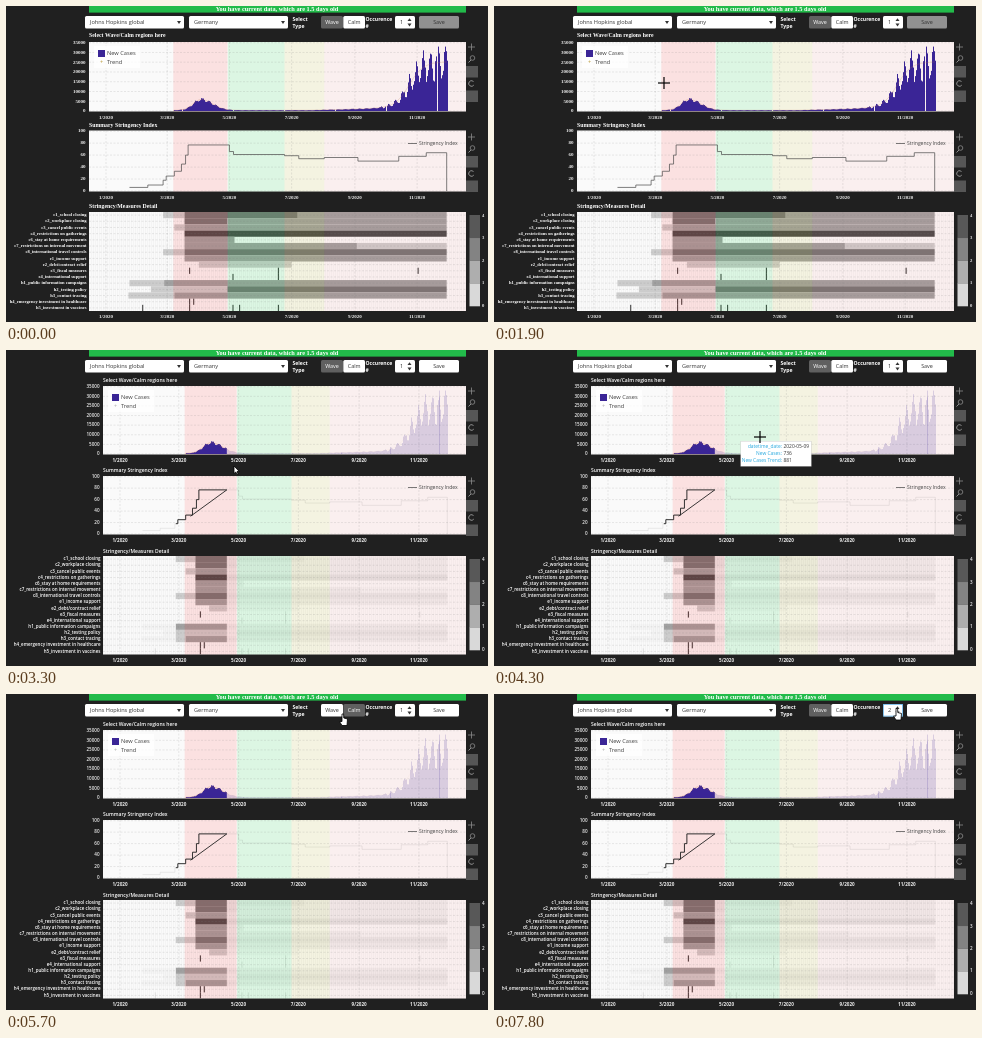
These frames come from a looping animation (482 by 316 pixels, 8000 ms). An HTML page with a canvas:

```html
<!DOCTYPE html>
<html lang="en">
<head>
<meta charset="utf-8">
<title>Wave selection dashboard</title>
<style>
html, body { margin: 0; width: 482px; height: 316px; overflow: hidden; background: #202020; }
canvas { display: block; width: 482px; height: 316px; }
</style>
</head>
<body>
<canvas id="stage"></canvas>
<script>
const LOOP = 8000, STEP = 100;
const canvas = document.getElementById('stage');
const ratio = window.devicePixelRatio || 1;
canvas.width = 482 * ratio;
canvas.height = 316 * ratio;
const c = canvas.getContext('2d');

const SERIF = '"Liberation Serif", serif', SANS = '"Open Sans", sans-serif';
const PURPLE = '#3a2596', GRID = 'rgba(120,120,120,.28)';
const RIGHT = 460, LAST = 334;

// Layout before and after the selection is applied
const BEFORE = {
  left: 83, x0: 100, scale: 1.02, font: SERIF, weight: 700, title: 5.8, tick: 5, row: 4.55,
  titleY: 30, top: [36, 105.5], mid: [124.5, 185.5], low: [206, 305]
};
const AFTER = {
  left: 97, x0: 114, scale: .98, font: SANS, weight: 600, title: 5, tick: 4.6, row: 4.5,
  titleY: 31, top: [36, 104.5], mid: [126, 184.5], low: [206, 304.5],
  pick: [57, 109]
};

const MONTHS = [1, 3, 5, 7, 9, 11].map(m => [(Date.UTC(2020, m - 1) - Date.UTC(2020, 0)) / 864e5, m]);
const BANDS = [
  [66, 119, 'rgba(255,20,20,.11)'], [119.5, 175, 'rgba(0,215,60,.12)'],
  [175, 214, 'rgba(185,180,0,.10)'], [214, 353, 'rgba(255,60,60,.055)']
];
// Day and new value of each change
const INDEX = [[23, 6], [41, 10], [56, 18], [59, 25], [67, 33], [74, 45], [78, 60], [80.5, 77],
  [121, 66], [125, 61], [175, 59], [189, 54], [214, 56], [247, 50], [287, 58], [314, 64], [LAST, 0]];
// Light from `lead`, full from `on`, one level lower from `ease`
const ROWS = [
  { name: 'c1_school closing', level: 3, lead: 56, ease: 188 },
  { name: 'c2_workplace closing', level: 3, ease: 119 },
  { name: 'c3_cancel public events', level: 2, lead: 67 },
  { name: 'c4_restrictions on gatherings', level: 4 },
  { name: 'c6_stay at home requirements', level: 2, end: 126 },
  { name: 'c7_restrictions on internal movement', level: 2, ease: 246 },
  { name: 'c8_international travel controls', level: 3, lead: 56 },
  { name: 'e1_income support', level: 2 },
  { name: 'e2_debt/contract relief', level: 1, on: 91, end: 182 },
  { name: 'e3_fiscal measures', marks: [82, 169, 306] },
  { name: 'e4_international support', marks: [124.5, 169] },
  { name: 'h1_public information campaigns', level: 2, lead: 23, on: 57 },
  { name: 'h2_testing policy', level: 3, lead: 44, on: 119 },
  { name: 'h3_contact tracing', level: 2, lead: 22, on: 67 },
  { name: 'h4_emergency investment in healthcare', marks: [82, 86] },
  { name: 'h5_investment in vaccines', marks: [36, 82, 124.5, 131, 169] }
];

const grey = level => `rgb(${Array(3).fill(247 - 43 * level)})`;
const noise = n => Math.abs(Math.sin(n * 127.1) * 43758.5) % 1;
const dayX = (g, d) => g.x0 + g.scale * d;

function trend(d) {
  const spring = 5500 * Math.exp(-(((d - 93) / (d < 93 ? 11 : 16)) ** 2));
  const autumn = 23000 / (1 + Math.exp((297 - d) / 7));
  return spring + autumn + (d > 66 ? 400 : 0) + Math.max(0, d - 200) * 14;
}

function cases(d) {
  const swing = d < 270 ? .13 : .33;
  return Math.min(33000, trend(d) * (1 + swing * (Math.cos((d - 311) * 2 * Math.PI / 7) + .7 * noise(d) - .35)));
}

function text(s, x, y, size, { font = SANS, color = '#eee', align = 'left', weight = 400 } = {}) {
  c.font = `${weight} ${size}px ${font}`;
  c.textAlign = align;
  c.textBaseline = 'middle';
  c.fillStyle = color;
  c.fillText(s, x, y);
}

function box(x1, y1, x2, y2, color) {
  c.fillStyle = color;
  c.fillRect(x1, y1, x2 - x1, y2 - y1);
}

function path(points, color, width = 1) {
  c.beginPath();
  points.forEach(p => c.lineTo(p[0], p[1]));
  c.strokeStyle = color;
  c.lineWidth = width;
  c.stroke();
}

function ring(x, y, r, from = 0, to = 7) {
  c.beginPath();
  c.arc(x, y, r, from, to);
  c.stroke();
}

function bands(g, [y1, y2]) {
  for (const [a, b, color] of BANDS) box(dayX(g, a), y1, Math.min(dayX(g, b), RIGHT), y2, color);
}

function grid(g, [y1, y2], ys) {
  c.save();
  c.setLineDash([2, 1.5]);
  for (const y of ys) path([[g.left, y], [RIGHT, y]], GRID, .6);
  for (const [d] of MONTHS) path([[dayX(g, d), y1], [dayX(g, d), y2]], GRID, .6);
  c.restore();
}

function frame(g, name, titleY, [y1, y2]) {
  text(name, g.left, titleY, g.title, { font: g.font, weight: g.weight, color: '#fff' });
  box(g.left, y1, RIGHT, y2, '#fafafa');
  for (const [d, m] of MONTHS)
    text(m + '/2020', dayX(g, d), y2 + 6, g.tick, { font: g.font, weight: 700, align: 'center' });
}

// Bands, grid and value labels; returns the value-to-y mapping
function valueAxis(g, [y1, y2], max, step) {
  const y = v => y2 - .5 - v / max * (y2 - y1 - 1.2);
  const ys = [];
  for (let v = 0; v <= max; v += step) {
    ys.push(y(v));
    text(v, g.left - 3.5, y(v), g.tick, { font: g.font, weight: g.weight, align: 'right' });
  }
  bands(g, [y1, y2]);
  grid(g, [y1, y2], ys);
  return y;
}

// Draws all data, or faint data with the picked days at full strength
function emphasise(g, [y1, y2], faint, draw) {
  if (!g.pick) return draw();
  const [a, b] = g.pick.map(d => dayX(g, d));
  c.save();
  c.globalAlpha = faint;
  draw();
  c.globalAlpha = 1;
  c.beginPath();
  c.rect(a, y1, b - a, y2 - y1);
  c.clip();
  draw();
  c.restore();
}

function casesPlot(g) {
  frame(g, 'Select Wave/Calm regions here', g.titleY, g.top);
  const y = valueAxis(g, g.top, 35000, 5000);
  emphasise(g, g.top, .17, () => {
    const line = [];
    for (let d = 66; d <= LAST; d++) {
      const x = Math.round(dayX(g, d));
      box(x, y(cases(d)), x + 1, y(0), PURPLE);
      line.push([x, y(trend(d))]);
    }
    path(line, 'rgba(190,120,80,.45)', .5);
  });
  const x = g.left + 9;
  box(x - 4, 40, x + 42, 62, 'rgba(255,255,255,.8)');
  box(x, 44, x + 7, 51, PURPLE);
  text('New Cases', x + 9, 47.3, 5.7, { color: '#444' });
  text('+', x + 3.5, 56.5, 5.5, { color: g.pick ? '#aaa' : '#b8962e', align: 'center' });
  text('Trend', x + 9, 56.8, 5.7, { color: '#444' });
}

function indexPlot(g) {
  frame(g, 'Summary Stringency Index', g.titleY + 90, g.mid);
  const y = valueAxis(g, g.mid, 100, 20);
  const line = INDEX.flatMap(([d, v], i) => [[d, INDEX[Math.max(0, i - 1)][1]], [d, v]]);
  const plot = (points, color, width) => path(points.map(([d, v]) => [dayX(g, d), y(v)]), color, width);
  if (g.pick) {
    const [a, b] = g.pick;
    plot(line, 'rgba(60,60,60,.13)', .7);
    plot([[a, 18], ...line.filter(p => p[0] > a && p[0] < b), [b, 77], [72, 31]], '#222', .9);
  } else plot(line, '#4a4a4a', .7);
  path([[402, 137.5], [411, 137.5]], '#444', .7);
  text('Stringency Index', 413, 137.5, 5, { color: '#444' });
}

function detailPlot(g) {
  frame(g, 'Stringency/Measures Detail', g.titleY + 170.3, g.low);
  const [y1, y2] = g.low, h = (y2 - y1) / ROWS.length;
  for (let x = g.left; x < RIGHT; x += 2) box(x, y1, x + 1, y2, 'rgba(0,0,0,.025)');
  emphasise(g, g.low, .12, () => ROWS.forEach((row, i) => {
    const { level, on = 77, lead = on, end = LAST, ease = end, marks = [] } = row;
    const bar = (a, b, color) => box(dayX(g, a), y1 + i * h, dayX(g, b), y1 + (i + 1) * h, color);
    if (level) {
      bar(lead, on, grey(1));
      bar(on, ease, grey(level));
      bar(ease, end, grey(level - 1));
    }
    for (const d of marks) bar(d - .5, d + .5, '#333');
  }));
  bands(g, g.low);
  const rowY = i => y1 + (i + .5) * h;
  grid(g, g.low, ROWS.map((row, i) => rowY(i)));
  ROWS.forEach((row, i) => text(row.name, g.left - 2.5, rowY(i), g.row,
    { font: g.font, weight: g.weight, align: 'right', color: '#fff' }));
  for (let n = 0; n < 5; n++) {
    if (n) box(463.5, 300 - n * 22.75, 474, 300.3 - (n - 1) * 22.75, grey(n - .3));
    text(n, 476, 299.5 - n * 22.4, 4.6, { font: g.font, weight: 600 });
  }
}

function tools(y) {
  const color = '#8c8c8c', x = 465.5;
  path([[x - 3.5, y], [x + 3.5, y]], color, .8);
  path([[x, y - 3.5], [x, y + 3.5]], color, .8);
  ring(x + 1, y + 11, 2.3);
  path([[x - .5, y + 13], [x - 3, y + 15.5]], color);
  ring(x, y + 36.5, 2.8, .6, 5.6);
  for (const top of [19, 43.5]) box(460, y + top, 472, y + top + 11.5, '#565656');
}

function field(x1, x2, color = '#fff') {
  c.fillStyle = color;
  c.beginPath();
  c.roundRect(x1, 10, x2 - x1, 12.5, 1.5);
  c.fill();
}

function triangle(x, y, k = 1.4) {
  c.fillStyle = '#333';
  c.beginPath();
  c.moveTo(x - 2, y - k);
  c.lineTo(x + 2, y - k);
  c.lineTo(x, y + k);
  c.fill();
}

function dropdown(s, x1, x2) {
  field(x1, x2);
  text(s, x1 + 5, 16.3, 5.6, { color: '#333' });
  triangle(x2 - 5, 16.5);
}

function button(s, x1, x2, bg, color = '#333') {
  field(x1, x2, bg);
  text(s, (x1 + x2) / 2, 16.3, 5.4, { color, align: 'center' });
}

function label(a, b, x) {
  [a, b].forEach((s, i) => text(s, x, 13.7 + i * 6.8, 5.1, { weight: 700, color: '#fff' }));
}

function controls(t, g) {
  box(83, 0, RIGHT, 6.6, '#22bb4a');
  text('You have current data, which are 1.5 days old', 271, 3.2, 6.3,
    { font: SERIF, weight: 700, align: 'center', color: '#fff' });
  dropdown('Johns Hopkins global', 79, 178);
  dropdown('Germany', 183, 282);
  label('Select', 'Type', 286.5);
  label('Occurence', '#', 359.5);

  const calm = t >= 5400 && t < 6200, hover = t >= 4800 && t < 5400;
  const on = ['#606060', '#fff'];
  button('Wave', 315, 337, ...(calm ? [] : on));
  button('Calm', 337.3, 359, ...(calm ? on : [hover ? '#e4e4e4' : '#fff']));

  field(389, 409);
  if (t >= 7100) {
    c.strokeStyle = '#68b4e8';
    c.lineWidth = .8;
    c.strokeRect(389.4, 10.4, 19.2, 11.7);
  }
  text(t >= 7800 ? '2' : '1', 394, 16.3, 5.7, { color: '#333' });
  triangle(403.5, 13.7, -1.4);
  triangle(403.5, 19);
  button('Save', 413, 453, g.pick ? '#fff' : '#919191');
}

function shape(x, y, points) {
  c.beginPath();
  points.forEach(([a, b]) => c.lineTo(x + a, y + b));
  c.closePath();
  c.fillStyle = '#fff';
  c.fill();
  c.strokeStyle = '#000';
  c.lineWidth = .8;
  c.stroke();
}

const CURSORS = {
  cross(x, y) {
    path([[x - 6, y], [x + 6, y]], '#000', 1.2);
    path([[x, y - 6], [x, y + 6]], '#000', 1.2);
  },
  arrow(x, y) {
    shape(x, y, [[0, 0], [0, 7.5], [1.8, 6], [3, 8.7], [4.1, 8.2], [3, 5.6], [5.2, 5.4]]);
  },
  hand(x, y) {
    shape(x, y, [[-1, 0], [.6, 0], [.8, 4], [4.5, 5], [4, 11.5], [-1, 11.5], [-3.5, 7.5], [-1, 7.5]]);
  }
};

// Time, x, y
const ROUTE = [
  [600, 245, 155], [1000, 172, 67], [1200, 170, 77], [1900, 170, 77], [2000, 170, 72],
  [2300, 245, 112], [2600, 221, 122], [3200, 221, 122], [3300, 228, 116], [4200, 229, 115],
  [4300, 266, 87], [4900, 341, 18], [5600, 341, 18], [5700, 337, 20], [6000, 327, 16],
  [6200, 327, 16], [7000, 403, 16], [7400, 403, 14.5]
];

function pointer(t) {
  const i = ROUTE.findIndex(p => p[0] >= t);
  if (i < 1) return ROUTE.at(i).slice(1);
  const [t0, x0, y0] = ROUTE[i - 1], [t1, x1, y1] = ROUTE[i], k = (t - t0) / (t1 - t0);
  return [x0 + (x1 - x0) * k, y0 + (y1 - y0) * k];
}

function cursorKind(g, y) {
  if (y < 23) return 'hand';
  return [g.top, g.mid].some(([a, b]) => y > a && y < b) ? 'cross' : 'arrow';
}

function selection(x, y) {
  const bottom = Math.min(y, 105.5);
  box(170, 72, x, bottom, 'rgba(225,225,225,.5)');
  c.save();
  c.setLineDash([2, 1.5]);
  c.strokeStyle = '#000';
  c.lineWidth = 1.2;
  c.strokeRect(170, 72, x - 170, bottom - 72);
  c.restore();
}

function tooltip() {
  box(246.5, 91, 317.5, 116.5, '#d0d0d0');
  box(247, 91.5, 317, 116, '#fff');
  [['datetime_date:', '2020-05-09'], ['New Cases:', '736'], ['New Cases Trend:', '881']].forEach(([k, v], i) => {
    text(k, 288, 96.5 + i * 7, 4.9, { color: '#26a8de', align: 'right' });
    text(v, 289.5, 96.5 + i * 7, 4.9, { color: '#333' });
  });
}

function draw(t) {
  const g = t < 3300 ? BEFORE : AFTER;
  c.setTransform(ratio, 0, 0, ratio, 0, 0);
  box(0, 0, 482, 316, '#202020');
  casesPlot(g);
  indexPlot(g);
  detailPlot(g);
  tools(41);
  tools(131);
  controls(t, g);
  const [x, y] = pointer(t);
  if (t >= 2100 && t < 3300) selection(x, y);
  if (t === 4300) tooltip();
  if (t >= 600) CURSORS[cursorKind(g, y)](x, y);
}

let shown = -1;
const start = performance.now();
function tick() {
  const t = Math.floor((performance.now() - start) % LOOP / STEP) * STEP;
  if (t !== shown) draw(shown = t);
  requestAnimationFrame(tick);
}
tick();
</script>
</body>
</html>
```
